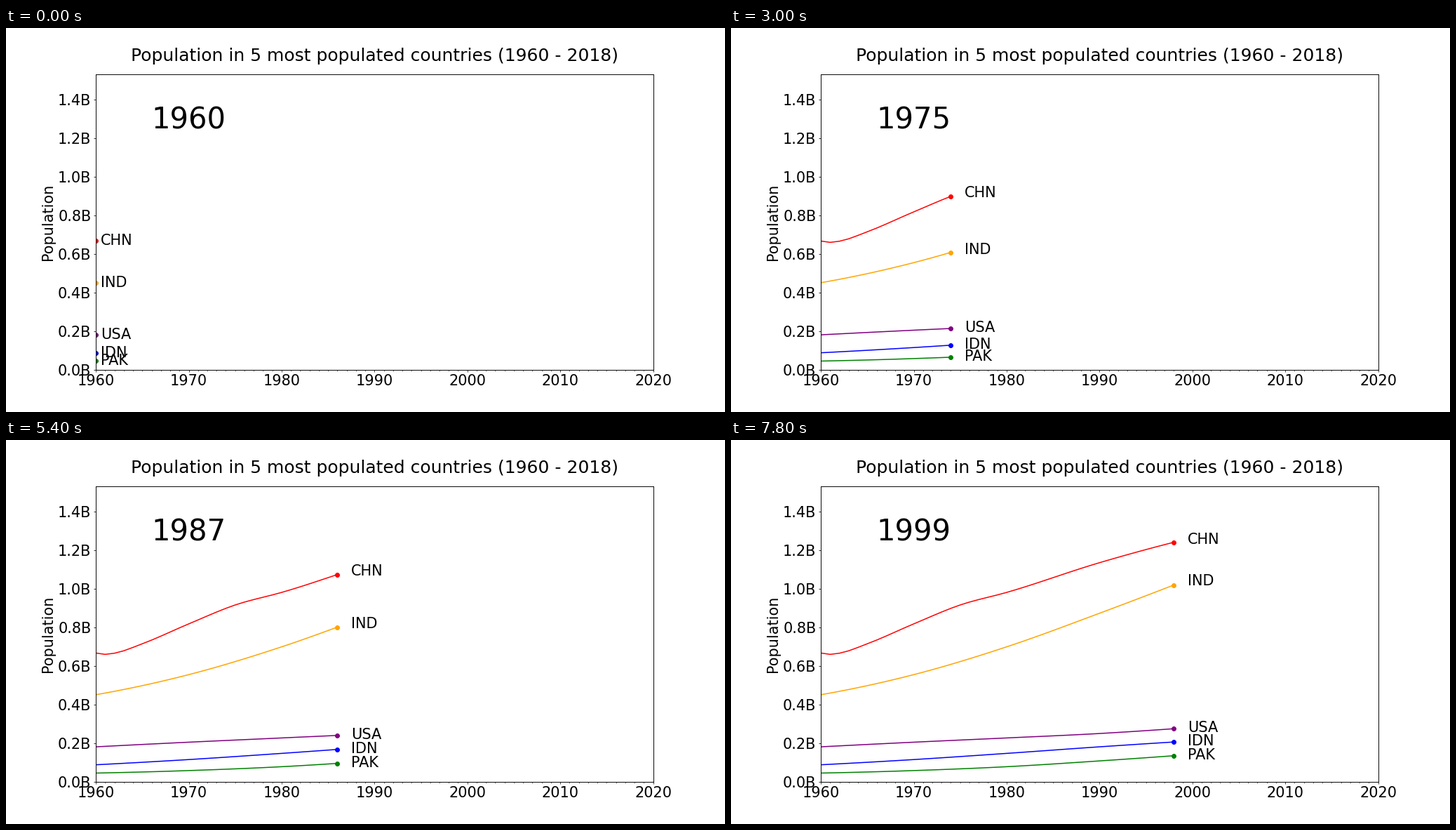
Recreate the animation shown at these times as a matplotlib script. Size 1025 by 547 pixels, loop 8 s.

```python
import matplotlib.pyplot as plt
import numpy as np
from matplotlib.animation import FuncAnimation
from matplotlib.ticker import MultipleLocator

DPI = 1025 / 15
FRAMES, INTERVAL = 40, 200
START = 1960
YEARS = START + np.arange(FRAMES)
DECADES = np.arange(1960, 2001, 10)


def curve(knots, values):
    """Yearly values on a cubic Hermite curve through a few key points."""
    knots, values = np.asarray(knots), np.asarray(values)
    slopes = np.gradient(values, knots, edge_order=2)
    k = np.searchsorted(knots, YEARS, side="right") - 1
    k = np.clip(k, 0, len(knots) - 2)
    span = knots[k + 1] - knots[k]
    t = (YEARS - knots[k]) / span
    ease = t * t * (3 - 2 * t)
    bend = t * (1 - t) * span * ((1 - t) * slopes[k] - t * slopes[k + 1])
    return values[k] + ease * (values[k + 1] - values[k]) + bend


# Populations in millions
SERIES = {
    "CHN": ("red", curve([1960, 1961, 1962, 1965, 1970, 1975, 1980, 1990, 1999],
                         [667, 660, 666, 715, 818, 916, 981, 1135, 1253])),
    "IND": ("orange", curve(DECADES, [451, 555, 699, 873, 1057])),
    "USA": ("purple", curve(DECADES, [181, 205, 227, 250, 282])),
    "IDN": ("blue", curve(DECADES, [88, 115, 147, 181, 212])),
    "PAK": ("green", curve(DECADES, [45, 58, 78, 108, 142])),
}

plt.rcParams.update({
    "font.family": "DejaVu Sans",
    "font.size": 22,
    "axes.linewidth": 1,
    "axes.titlepad": 20,
})
fig, ax = plt.subplots(figsize=(15, 8.005), dpi=DPI)
fig.subplots_adjust(left=0.125, right=0.9, bottom=0.11, top=0.88)

ax.set_xlim(START, 2020)
ax.set_ylim(0, 1532)
ax.xaxis.set_major_locator(MultipleLocator(10))
ax.xaxis.set_minor_locator(MultipleLocator(1))
ax.yaxis.set_major_locator(MultipleLocator(200))
ax.yaxis.set_major_formatter(lambda value, _: f"{value / 1000:.1f}B")
ax.set_ylabel("Population")
ax.set_title("Population in 5 most populated countries (1960 - 2018)")

year_text = ax.text(1966, 1250, "", fontsize=44)
artists = []
for code, (color, values) in SERIES.items():
    line, = ax.plot([], [], color=color, lw=1.6)
    dot, = ax.plot([], [], "o", color=color, ms=6.3)
    label = ax.text(START, 0, code, va="center")
    artists.append((values, line, dot, label))


def update(i):
    """Lines and dots trail the labels by one year."""
    last = max(i - 1, 0)
    year_text.set_text(str(YEARS[i]))
    for values, line, dot, label in artists:
        line.set_data(YEARS[:last + 1], values[:last + 1])
        dot.set_data([YEARS[last]], [values[last]])
        label.set_position((YEARS[i] + 0.5, values[i]))


animation = FuncAnimation(fig, update, frames=FRAMES, interval=INTERVAL,
                          init_func=lambda: update(0), repeat=True,
                          repeat_delay=0)
plt.show()
```
